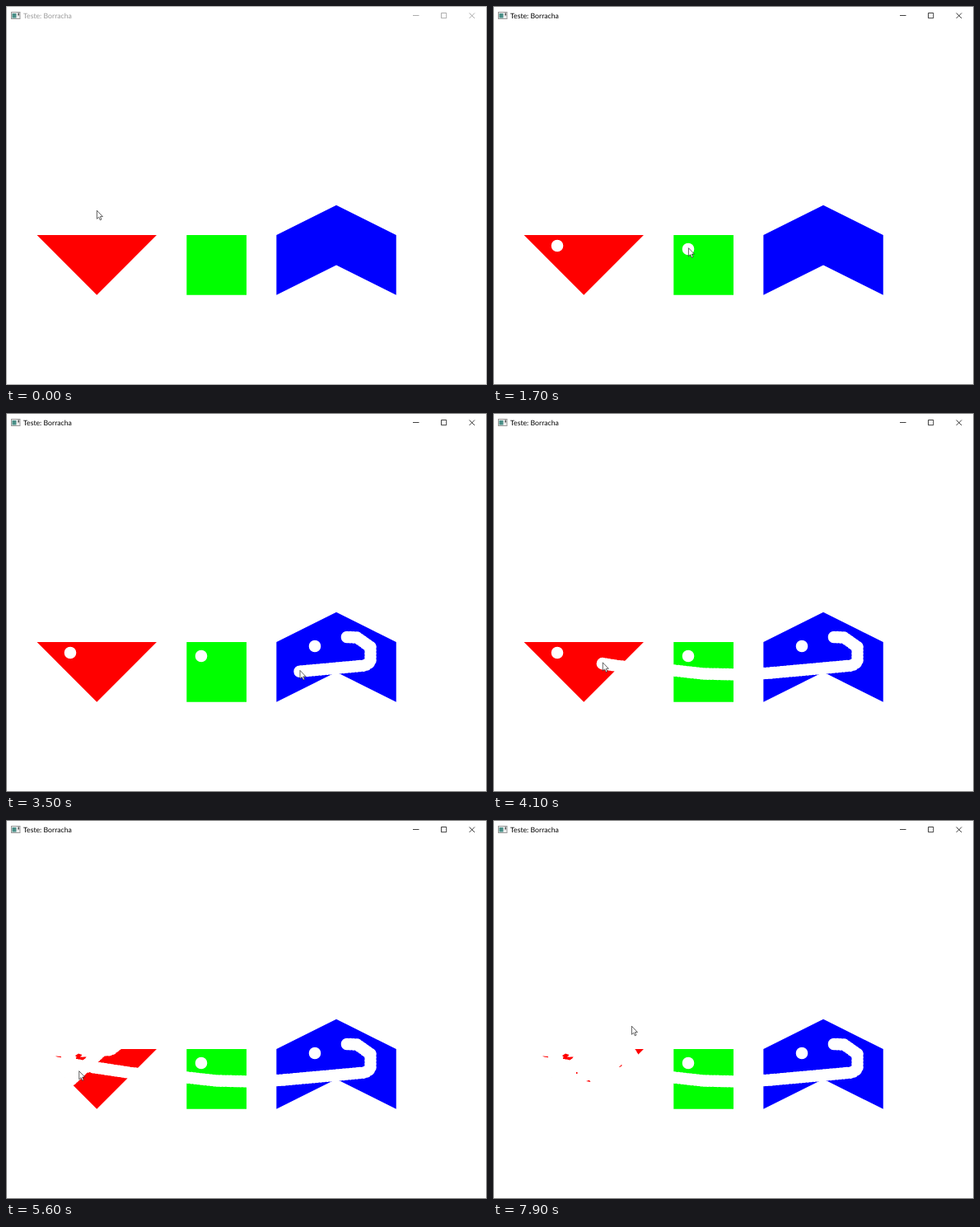
Recreate the animation shown at these times as an HTML page. Size 584 px wide and 460 px high, loop 8 s.

```html
<!DOCTYPE html>
<html lang="pt">
<head>
<meta charset="utf-8">
<title>Teste: Borracha</title>
<style>
  html, body { margin: 0; width: 100%; height: 100%; overflow: hidden; background: #fff; }
  svg { display: block; width: 584px; height: 460px; }
  text { font: 8.7px Lato, "Open Sans", sans-serif; text-rendering: geometricPrecision; }
  #glyphs { fill: none; stroke-width: .8; }
  #rubber { fill: none; stroke: #fff; stroke-width: 14.6; stroke-linecap: round; stroke-linejoin: round; stroke-dasharray: .01 4; }
</style>
</head>
<body>
<svg viewBox="0 0 584 460">
  <rect width="584" height="460" fill="#fff"/>
  <g transform="translate(1.2 23.6) scale(.727)">
    <path fill="#f00" d="M50 350H250L150 450Z"/>
    <path fill="#0f0" d="M300 350H400V450H300Z"/>
    <path fill="#00f" d="M450 350L550 300L650 350V450L550 400L450 450Z"/>
  </g>
  <path id="rubber"/>
  <!-- crumbs the eraser never reaches -->
  <path fill="#f00" d="M60 286.500L67 287V288.300L62 287.600Z
    M84 286L88 283.500L92.500 285L88 290Z
    M101 306H102.500V308H101Z M113 317L117 315.800L118.500 318Z"/>
  <rect id="border" x=".5" y=".5" width="583" height="459" fill="none"/>
  <rect x="6.500" y="7.500" width="10.500" height="8" fill="#eee" stroke="#999"/>
  <rect x="7.500" y="9" width="5" height="5.500" fill="#4a8f88"/>
  <rect x="14.500" y="8.500" width="1.500" height="3" fill="#555"/>
  <text id="title" x="21" y="14.500">Teste: Borracha</text>
  <path id="glyphs" d="M494 11.500H501.500M528.500 8.500H534.700V14.700H528.500ZM562.500 8.500L569 15M569 8.500L562.500 15"/>
  <path id="cursor" fill="#fff" stroke="#222" stroke-width=".7" stroke-linejoin="round"
    d="M.4 .2V10.300L2.700 8.200L4.300 11.800L5.900 11.100L4.400 7.600H7.400Z"/>
</svg>
<script>
const LOOP = 8000, STEP = 100, CLICK = 700;
const $ = id => document.getElementById(id);

const mix = (a, b, f) => [a[0] + (b[0] - a[0]) * f, a[1] + (b[1] - a[1]) * f];
const dist = (a, b) => Math.hypot(b[0] - a[0], b[1] - a[1]);

// Points swinging from side to side along the line a-b.
function weave(a, b, amp, turns) {
  const len = dist(a, b), nx = Math.abs(b[1] - a[1]) / len, ny = Math.abs(b[0] - a[0]) / len;
  return Array.from({ length: turns + 1 }, (_, i) => {
    const [x, y] = mix(a, b, i / turns), side = i % 2 ? -amp : amp;
    return [x + nx * side, y + ny * side];
  });
}

// The part of a polyline covered at constant speed after the share u.
function trace(points, u) {
  let left = u * points.reduce((sum, p, i) => i ? sum + dist(points[i - 1], p) : 0, 0);
  const done = [points[0]];
  for (let i = 1; i < points.length && left > 0; i++) {
    const len = dist(points[i - 1], points[i]);
    done.push(mix(points[i - 1], points[i], Math.min(1, left / len)));
    left -= len;
  }
  return done;
}

const rest = [110, 249.5], red = [78, 291], green = [237, 295], blue = [375, 283];
const hook = [414, 272], turn = [337, 315.5], above = [157, 255.5];

// Each phase: start, end, kind, points.
const phases = [
  [0, 600, 'move', [rest, red]],
  [CLICK, CLICK, 'dot', [red]],
  [900, 1500, 'move', [red, green]],
  [1700, 1700, 'dot', [green]],
  [1800, 2100, 'move', [green, blue]],
  [2200, 2200, 'dot', [blue]],
  [2300, 2500, 'move', [blue, hook]],
  [2800, 3600, 'draw', [hook, [426, 272.5], [442.5, 284], [442.5, 302], [436, 306.5], turn]],
  [3600, 4800, 'draw', [turn, [300, 317.5], [255, 316.5], [215, 312], [155, 307.5], [112, 301],
    [65, 294.5], [22, 294], [62, 330], [84, 311], [116, 280], above]],
  [4800, 5800, 'draw', [above, [127, 279], [36, 283], [8, 300], [70, 305], [107, 307], [80, 318], [90, 326]]],
  [5900, 6400, 'dot', weave([110, 287], [178, 287], 5, 4)],
  [6500, 7900, 'draw', [[151, 313.5], ...weave([172, 286], [115, 291], 6, 10),
    ...weave([140, 303], [100, 345], 15, 9), [168, 251.5]]]
];

const dab = p => `M${p}h.01`;

function render(t) {
  let d = '', tip;
  for (const [start, end, kind, points] of phases) {
    if (t < start) break;
    const u = end > start ? Math.min(1, (t - start) / (end - start)) : 1;
    const done = kind === 'dot'
      ? points.slice(0, Math.floor(u * (points.length - 1)) + 1)
      : trace(points, u);
    tip = done[done.length - 1];
    if (kind === 'dot') d += done.map(dab).join('');
    if (kind === 'draw') d += 'M' + done.join('L') + dab(tip);
  }
  $('rubber').setAttribute('d', d);
  $('cursor').setAttribute('transform', `translate(${tip[0]} ${tip[1] - 1.5})`);

  const active = t >= CLICK;
  $('title').setAttribute('fill', active ? '#000' : '#999');
  $('glyphs').setAttribute('stroke', active ? '#111' : '#999');
  $('border').setAttribute('stroke', active ? '#777' : '#aaa');
}

const origin = performance.now();
function tick() {
  const t = (performance.now() - origin) % LOOP;
  render(Math.floor(t / STEP) * STEP);
  requestAnimationFrame(tick);
}
tick();
</script>
</body>
</html>
```
